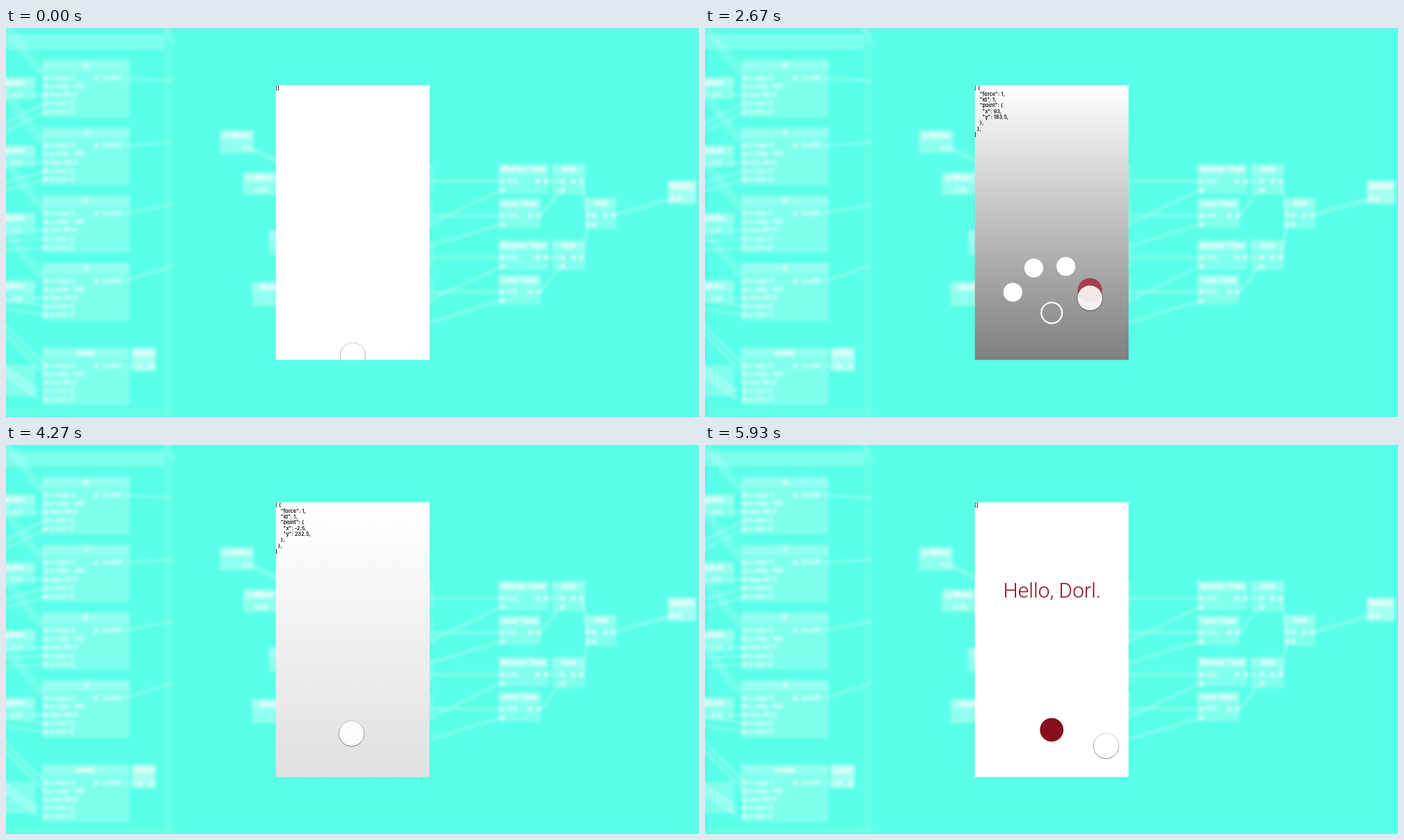
An HTML page with a canvas for the animation above (6070 ms loop, 998 by 561 pixels).

```html
<!DOCTYPE html>
<html lang="en">
<head>
<meta charset="utf-8">
<title>Radial menu prototype</title>
<style>
  html, body { margin: 0; width: 100%; height: 100%; overflow: hidden; background: #59ffe8; }
  canvas { display: block; width: 100%; height: 100%; }
</style>
</head>
<body>
<canvas id="stage" width="998" height="561"></canvas>
<script>
const W = 998, H = 561, PAD = 20;
const LOOP = 6070, STEPS = 91;
const SCREEN = { x: 388.6, y: 82.4, w: 221.4, h: 396.4 };
const HUB = { x: 499.3, y: 410.8 };
const FAN = { lift: 12, radius: 58.7, spread: 0.81 };
const TAU = Math.PI * 2;
const white = a => `rgba(255,255,255,${a})`;

// ---------- blurred node graph ----------
function makeGraph() {
  const canvas = document.createElement('canvas');
  canvas.width = W + 2 * PAD;
  canvas.height = H + 2 * PAD;
  const g = canvas.getContext('2d');
  g.translate(PAD, PAD);
  g.textBaseline = 'middle';

  const box = (x, y, w, h, a) => {
    g.fillStyle = white(a);
    g.fillRect(x, y, w, h);
  };
  const wire = (x1, y1, x2, y2, width = 4, a = 0.26) => {
    g.strokeStyle = white(a);
    g.lineWidth = width;
    g.beginPath();
    g.moveTo(x1, y1);
    g.lineTo(x2, y2);
    g.stroke();
  };
  const label = (s, x, y, size = 8.5, align = 'left') => {
    g.font = `700 ${size}px Inter, sans-serif`;
    g.textAlign = align;
    g.fillStyle = '#fff';
    g.fillText(s, x, y);
  };
  const ports = (y, ...xs) => xs.forEach(x => box(x - 3, y - 3, 6, 6, 0.75));
  const node = (x, y, w, h, title, a = 0.25) => {
    box(x, y, w, h, a);
    box(x, y, w, 15, 0.16);
    for (let i = 0; i < 2; i++) label(title, x + w / 2, y + 8, 10, 'center');
  };

  // enclosing panel
  box(-PAD, 9, 249, 22, 0.22);
  box(229, -PAD, 11, H + 2 * PAD, 0.07);
  box(-PAD, 550, 260, 9, 0.08);
  wire(226, -4, 243, 25, 8, 0.12);

  // input column
  const inputs = ['x-step-2', 'y-step--140', 'size-60.0', 'x-size-2', 'y-size-2'];
  for (let i = 0; i < 5; i++) {
    const last = i === 4;
    const y = last ? 461 : 46 + i * 97.7;
    node(52, y, 126, 83, last ? 'mode' : String(i), 0.23);
    inputs.forEach((s, r) => {
      ports(y + 26 + r * 12.2, 57);
      label(s, 63, y + 26 + r * 12.2);
    });
    ports(y + 26, 130);
    label('0xx0ff', 139, y + 26);
    wire(170, y + 26, last ? 190 : 240, y + 26 + (last ? 0 : 4 - i * 8.7));
    for (const r of [3, 4]) wire(-10, y + r * 12.2 + (last ? -78 : 60 - i * 15), 57, y + 26 + (r - (last ? 3 : 0)) * 12.2);
    if (last) continue;
    node(-PAD, y + 25, 62, 32, 'option', 0.28);
    label('0.0', 10, y + 51);
    wire(36, y + 51, 57, y + 50);
    wire(-8, y - 58, 52, y + 20, 13, 0.15);
  }
  box(-PAD, 486, 62, 45, 0.24);
  for (const d of [0, 10]) wire(-5, 487 + d, 46, 524 + d, 6);
  node(181, 461, 35, 34, 'Color', 0.45);
  ports(488, 193, 210);

  // transform nodes, partly behind the phone
  node(308, 147, 49, 34, 'x-Move', 0.32);
  node(341, 208, 50, 33, 'y-Move', 0.32);
  node(379, 292, 50, 35, 'Move', 0.32);
  node(354, 366, 50, 35, 'Scale', 0.32);
  label('0.0', 340, 173);
  label('0.00', 358, 234);
  wire(353, 173, 392, 193, 6);

  // comparison pairs
  for (const top of [196, 306]) {
    for (let k = 0; k < 2; k++) {
      const y = top + k * 49.5, row = y + 25, w = 72 - 11 * k;
      box(605, y, 9, 42, 0.17);
      node(709, y, w, 43, k ? 'Less Than' : 'Shorter Than');
      ports(row, 715, 709 + w - 15, 709 + w - 3);
      ports(row + 13, 715);
      label('0.0..', 722, row);
      wire(610, row, 712, row);
      wire(610, row + 62 - 18 * k, 712, row + 13);
      wire(709 + w, row, 798, top + 25 + 13 * k);
    }
    node(786, top, 48, 44, 'And');
    ports(top + 25, 802, 817, 829);
    ports(top + 38, 802);
    wire(829, top + 25, 838, top < 250 ? 270 : 283);
  }
  node(834, 245, 45, 45, 'And');
  ports(270, 838, 847, 863, 874);
  ports(283, 838, 847);
  wire(874, 270, 960, 246, 5);
  node(953, 220, 41, 34, 'Switch', 0.45);
  ports(246, 960, 969);

  const soft = document.createElement('canvas');
  soft.width = W;
  soft.height = H;
  const s = soft.getContext('2d');
  s.fillStyle = '#59ffe8';
  s.fillRect(0, 0, W, H);
  s.filter = 'blur(2.3px)';
  s.drawImage(canvas, -PAD, -PAD);
  return soft;
}

// ---------- timeline ----------
const clamp = v => Math.max(0, Math.min(1, v));
const smooth = u => u * u * (3 - 2 * u);
const ramp = (t, start, length) => smooth(clamp((t - start) / length));

// The four choices sit on an arc above the hub.
function itemOffset(i, turn = 0) {
  const a = (i - 1.5) * FAN.spread + turn;
  return { x: FAN.radius * Math.sin(a), y: -FAN.lift - FAN.radius * Math.cos(a) };
}

// The finger visits each choice in turn, returns, taps the hub and leaves.
const visits = [0, 1, 2, 3].map(i => {
  const p = itemOffset(i);
  return { t: 1180 + i * 496, x: HUB.x + p.x, y: HUB.y + p.y + 11 };
});
const PATH = [
  { t: 0, x: 499.5, y: 472 },
  { t: 300, ...HUB },
  { t: 800, x: 487, y: 378 },
  ...visits,
  { t: 3270, ...HUB },
  { t: 3530, ...HUB },
  { t: 3668, x: 508.5, y: 393.8 },
  { t: 4130, x: 497.7, y: 416 },
  { t: 4870, x: 497.7, y: 416 },
  { t: 4930, x: 498, y: 414 },
  { t: 5330, x: 498, y: 414 },
  { t: 5930, x: 577.6, y: 433.8 }
];

function fingerAt(t) {
  const i = PATH.findIndex(p => p.t > t);
  if (i < 0) return PATH[PATH.length - 1];
  const a = PATH[i - 1], b = PATH[i];
  const u = ramp(t, a.t, b.t - a.t);
  return { x: a.x + (b.x - a.x) * u, y: a.y + (b.y - a.y) * u };
}

const isTouching = t => (t >= 270 && t < 3520) || (t >= 4120 && t < 5320);
const menuOpen = t => ramp(t, 270, 260) - ramp(t, 3500, 160) + ramp(t, 4270, 330) - ramp(t, 5300, 180);
const shadeLevel = t => ramp(t, 270, 260) - ramp(t, 5340, 190)
  - 0.76 * (ramp(t, 3510, 150) - ramp(t, 4270, 330));
const fingerAlpha = t => 0.88 - 0.24 * ramp(t, 4800, 130) + 0.3 * ramp(t, 5340, 140);

// ---------- phone screen ----------
const c = document.getElementById('stage').getContext('2d');

function circle(x, y, r) {
  c.beginPath();
  c.arc(x, y, r, 0, TAU);
}

function disc(x, y, r, fill) {
  circle(x, y, r);
  c.fillStyle = fill;
  c.fill();
}

function drawReadout(t, finger) {
  const unit = v => Math.round(v / 0.594 * 2) / 2;
  const lift = t > 4000 ? 2.4 : 0;
  const lines = isTouching(t) ? [
    '[ {', '    "force": 1,', '    "id": 1,', '    "point": {',
    `      "x": ${unit(finger.x - 499.2)},`,
    `      "y": ${unit(finger.y + lift - 280.3)},`,
    '    },', '  },', ']'
  ] : ['[]'];
  c.font = '600 7.45px Inter, sans-serif';
  c.fillStyle = '#111';
  lines.forEach((s, i) => c.fillText(s, 388, 89.2 + i * 8.33));
}

function drawMenu(open, finger) {
  if (open <= 0) return;
  const hover = [0, 1, 2, 3].map(i => {
    const p = itemOffset(i);
    return open * clamp((26 - Math.hypot(finger.x - HUB.x - p.x, finger.y - HUB.y - p.y)) / 10);
  });
  const grow = clamp(open * 2);

  c.globalAlpha = grow;
  circle(HUB.x, HUB.y, (16 - Math.max(...hover)) * grow);
  c.lineWidth = 2.2;
  c.strokeStyle = '#fff';
  c.stroke();

  hover.forEach((h, i) => {
    // neighbours swing away from the hovered choice
    const turn = hover.reduce((sum, other, j) => sum + Math.sign(i - j) * other * 0.05, 0);
    const p = itemOffset(i, turn);
    const mix = to => Math.round(255 + (to - 255) * h);
    disc(HUB.x + p.x * open, HUB.y + p.y * open, (13.6 + 4 * h) * grow,
      `rgb(${mix(167)},${mix(62)},${mix(78)})`);
  });
  c.globalAlpha = 1;
}

function drawHello(alpha) {
  c.globalAlpha = alpha;
  c.font = '300 30px Roboto, sans-serif';
  c.fillStyle = '#8c0d1c';
  c.fillText('Hello, Dorl.', 429.5, 220.3);
  disc(HUB.x, HUB.y, 17, '#850f1c');
  c.globalAlpha = 1;
}

function fade(y1, y2, from, to) {
  const g = c.createLinearGradient(0, y1, 0, y2);
  g.addColorStop(0, `rgba(0,0,0,${from})`);
  g.addColorStop(1, `rgba(0,0,0,${to})`);
  return g;
}

function drawFinger({ x, y }, alpha) {
  disc(x, y, 18, white(alpha));
  circle(x, y + 0.2, 18.3);
  c.lineWidth = 0.9;
  c.strokeStyle = fade(y - 18, y + 18, 0.2, 0.55);
  c.stroke();
}

const graph = makeGraph();

function draw(t) {
  const { x, y, w, h } = SCREEN;
  const finger = fingerAt(t);
  c.drawImage(graph, 0, 0);
  c.save();
  c.beginPath();
  c.rect(x, y, w, h);
  c.clip();
  c.fillStyle = '#fff';
  c.fillRect(x - 1, y - 1, w + 2, h + 2);
  c.fillStyle = fade(y, y + h, 0, 0.5 * shadeLevel(t));
  c.fillRect(x - 1, y - 1, w + 2, h + 2);
  drawReadout(t, finger);
  drawHello(ramp(t, 5500, 260));
  drawMenu(menuOpen(t), finger);
  drawFinger(finger, fingerAlpha(t));
  c.restore();
}

// The picture advances in even steps, about fifteen a second.
const step = LOOP / STEPS;
const start = performance.now();
function tick() {
  const n = Math.floor(((performance.now() - start) % LOOP + 8) / step) % STEPS;
  draw(n * step);
  requestAnimationFrame(tick);
}
tick();
</script>
</body>
</html>
```
